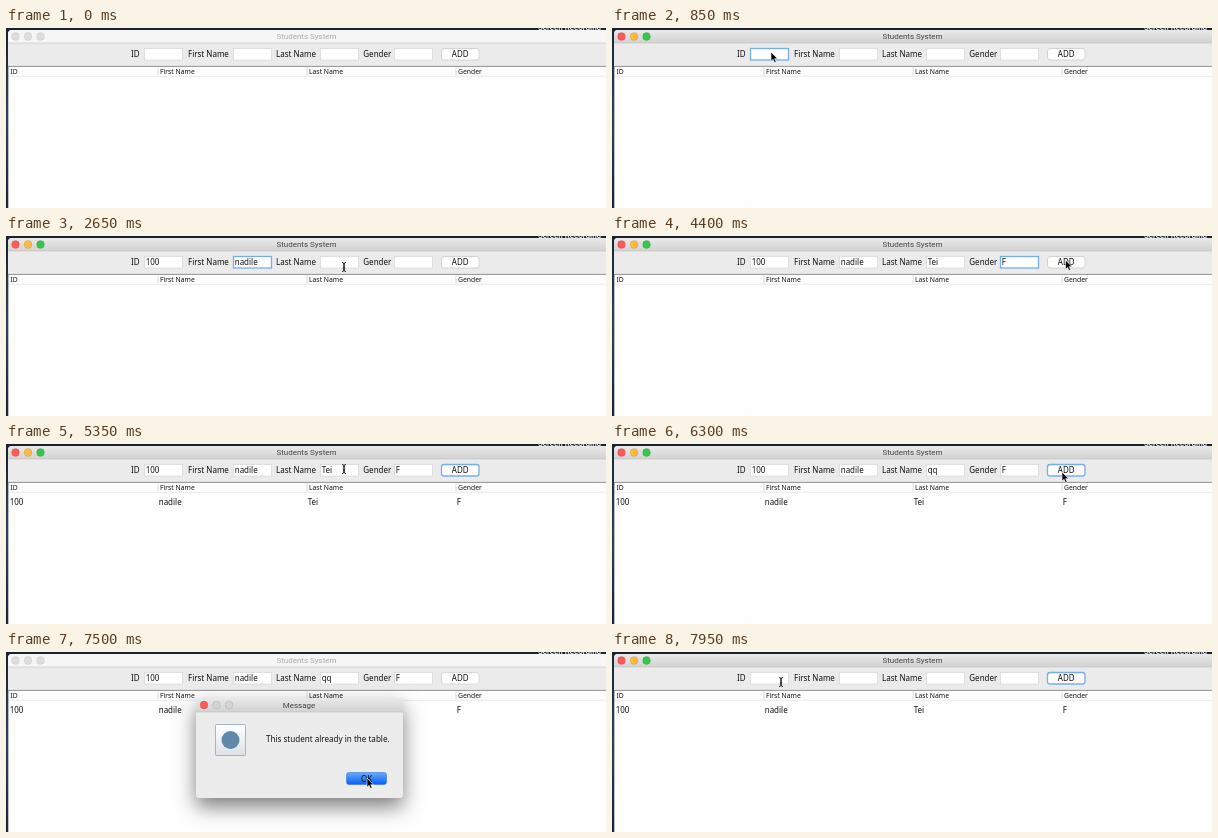
Animation of 600x180 px, one loop 8 s. Source, as an HTML page:

```html
<!DOCTYPE html>
<html lang="en">
<head>
<meta charset="utf-8">
<title>Students System</title>
<style>
  html, body { margin: 0; width: 100%; height: 100%; overflow: hidden; background: #fff; }
  svg { display: block; width: 600px; height: 180px; }
  text { font: 500 8px "Noto Sans", "Open Sans", sans-serif; fill: #111; white-space: pre; }
  .title { font: 400 8px Roboto, sans-serif; text-anchor: middle; fill: #444; }
  .head { font-size: 6.8px; }
  .mid { text-anchor: middle; }
  .field { fill: #fff; stroke: #d0d0d0; stroke-width: .6; }
  .button { fill: #fff; stroke: #c4c4c4; stroke-width: .7; }
  .focus { stroke: #78aee6; stroke-width: 1.3; }
  .inactive .title { fill: #aaa; }
  .inactive .focus { stroke: #c8c8c8; stroke-width: .6; }
  .inactive #bar { fill: #f6f6f6; }
  .inactive .light { fill: #dedede; stroke: #cacaca; }
  .light { stroke-width: .5; }
  #dialog .frame { filter: drop-shadow(0 9px 10px rgba(0,0,0,.5)); }
</style>
</head>
<body>
<svg id="stage" viewBox="0 0 600 180">
  <defs>
    <linearGradient id="chrome" x2="0" y2="1"><stop stop-color="#e9e9e9"/><stop offset="1" stop-color="#d2d2d2"/></linearGradient>
    <linearGradient id="desk" x2="0" y2="1"><stop stop-color="#182233"/><stop offset=".5" stop-color="#2c3c5c"/><stop offset="1" stop-color="#141c38"/></linearGradient>
    <linearGradient id="blue" x2="0" y2="1"><stop stop-color="#63aefc"/><stop offset="1" stop-color="#0a5cf8"/></linearGradient>
    <linearGradient id="tile" x2="0" y2="1"><stop stop-color="#fff"/><stop offset="1" stop-color="#dce2e8"/></linearGradient>
  </defs>
  <rect width="600" height="180" fill="url(#desk)"/>
  <text x="532" y="2.3" style="font:500 8px Roboto,sans-serif;fill:#fff">Screen Recording</text>
  <g id="window">
    <path d="M2 180V6q0-4 4-4H600V180Z" fill="#fefefe"/>
    <path id="bar" d="M2 15V6q0-4 4-4H600V15Z" fill="url(#chrome)"/>
    <path d="M2 15H600V38H2Z" fill="#ebebeb"/>
    <path d="M2 15H600" stroke="#c2c2c2" stroke-width=".6"/>
    <path d="M2 38.4H600" stroke="#777" stroke-width=".8"/>
    <path d="M2 48.3H600" stroke="#d8d8d8" stroke-width=".6"/>
    <path d="M2.3 38V180" stroke="#777" stroke-width=".6"/>
    <text class="title" x="300.5" y="11.3">Students System</text>
  </g>
  <g id="row"></g>
  <g id="dialog">
    <rect class="frame" x="190" y="46" width="207" height="100" rx="3.5" fill="#ececec"/>
    <path d="M190 60V49.500q0-3.500 3.500-3.500H393.500q3.500 0 3.500 3.500V60Z" fill="url(#chrome)"/>
    <path d="M190 60H397" stroke="#bcbcbc" stroke-width=".6"/>
    <text class="title" x="293" y="56">Message</text>
    <rect x="209.500" y="72.500" width="30" height="31" rx="1" fill="url(#tile)" stroke="#93a5b8" stroke-width=".8"/>
    <circle cx="224.500" cy="88" r="9" fill="#5f87a8"/>
    <text x="260" y="90" style="font-size:8.07px">This student already in the table.</text>
    <rect x="340.500" y="120.500" width="40" height="12" rx="2.500" fill="url(#blue)" stroke="#2a67cc" stroke-width=".5"/>
    <text class="mid" x="360.500" y="129.500">OK</text>
  </g>
  <path id="arrow" d="M0 0V9.200L2.100 7.300L3.500 10.500L5.100 9.800L3.700 6.700H6.500Z" fill="#000" stroke="#fff" stroke-width=".6"/>
  <path id="beam" d="M-2-4.500Q0-4.500 0-3V3Q0 4.500-2 4.500M2-4.500Q0-4.500 0-3V3Q0 4.500 2 4.500M-1 1H1" fill="none" stroke="#111" stroke-width=".9"/>
</svg>
<script>
const $ = id => document.getElementById(id);
function add(parent, tag, attrs, text = "") {
  const el = document.createElementNS("http://www.w3.org/2000/svg", tag);
  for (const key in attrs) el.setAttribute(key, attrs[key]);
  el.textContent = text;
  return parent.appendChild(el);
}
const win = $("window"), dialog = $("dialog");
const FIRST = "nadile", LAST = "Tei";

function lights(parent, x, y, fills) {
  fills.forEach((fill, i) => add(parent, "circle",
    { class: "light", cx: x + i * 12.5, cy: y, r: 3.9, fill, stroke: "rgba(0,0,0,.18)" }));
}
lights(win, 9.5, 8.5, ["#fc5b57", "#fdbc40", "#34c84a"]);
lights(dialog, 198, 53, ["#fc5b57", "#d4d4d4", "#d4d4d4"]);

const columns = [3, 152, 301, 450];
["ID", "First Name", "Last Name", "Gender"].forEach((name, i) => {
  add(win, "text", { class: "head", x: columns[i] + (i ? 2 : 1.5), y: 45.9 }, name);
  if (i) add(win, "path", { d: `M${columns[i]} 39.500V47.500`, stroke: "#ccc", "stroke-width": .7 });
  add($("row"), "text", { x: columns[i] + .7, y: 60.6 }, ["100", FIRST, LAST, "F"][i]);
});

const inputs = [["ID", 125, 138.5], ["First Name", 182, 227.5], ["Last Name", 270, 314.5], ["Gender", 357.3, 388.5]]
  .map(([name, x, left]) => {
    add(win, "text", { x, y: 29.4 }, name);
    const box = add(win, "rect", { class: "field", x: left, y: 20.5, width: 38, height: 11.5 });
    return { box, text: add(win, "text", { x: left + 1.2, y: 29.4 }) };
  });
const button = add(win, "rect", { class: "button", x: 435.5, y: 20.5, width: 37.5, height: 11.5, rx: 2.5 });
add(win, "text", { class: "mid", x: 454.2, y: 29.2 }, "ADD");
const targets = [...inputs.map(i => i.box), button];

// Typing runs: field, start, ms per key, text
const typing = [
  [0, 1150, 150, "100"], [1, 1800, 110, FIRST], [2, 2950, 130, LAST],
  [3, 3950, 50, "F"], [2, 5600, 150, "qq"]
];
// Focus changes: time, target
const focusSteps = [[750, 0], [1650, 1], [2750, 2], [3700, 3], [4550, 4], [5450, 2], [6300, 4]];
// Pointer path: time, x, y
const path = [
  [50, 560, -12], [650, 159, 24], [1400, 159, 24], [1650, 248, 27], [2500, 248, 27],
  [2650, 338, 31], [3400, 338, 31], [3550, 370, 45], [3700, 408, 28], [4150, 408, 28],
  [4400, 453.5, 24], [4650, 453.5, 24], [4850, 476, 26], [5000, 470, 26], [5300, 338, 25],
  [5950, 338, 25], [6250, 450, 28], [6850, 450, 28], [7250, 361, 126], [7650, 361, 126],
  [7900, 169, 30], [8000, 169, 30]
];

function pointerAt(t) {
  let i = 0;
  while (i < path.length - 2 && t >= path[i + 1][0]) i++;
  const [a, ax, ay] = path[i], [b, bx, by] = path[i + 1];
  const p = Math.min(1, Math.max(0, (t - a) / (b - a))), e = p * p * (3 - 2 * p);
  return [ax + (bx - ax) * e, ay + (by - ay) * e];
}
const show = (el, on) => el.style.display = on ? "" : "none";

function draw(t) {
  const dialogOpen = t >= 6400 && t < 7600;
  win.classList.toggle("inactive", t < 700 || (t >= 6400 && t < 7700));
  const values = ["", "", "", ""];
  if (t < 7600) for (const [field, start, pace, word] of typing)
    if (t >= start) values[field] = word.slice(0, 1 + Math.floor((t - start) / pace));
  inputs.forEach((input, i) => input.text.textContent = values[i]);

  const focused = focusSteps.filter(s => t >= s[0]).pop();
  targets.forEach((el, i) => el.classList.toggle("focus", !!focused && focused[1] === i));
  show($("row"), t >= 4600);
  show(dialog, dialogOpen);

  // The pointer hides while keys are pressed
  const hidden = typing.some(([, start, pace, word]) => t >= start && t < start + pace * word.length);
  const [x, y] = pointerAt(t);
  const overField = t > 900 && !dialogOpen && y > 19 && y < 33 &&
    inputs.some(({ box }) => x >= +box.getAttribute("x") && x <= +box.getAttribute("x") + 38);
  for (const [id, on] of [["arrow", !overField], ["beam", overField]]) {
    $(id).setAttribute("transform", `translate(${x} ${y})`);
    show($(id), on && !hidden);
  }
}

const origin = performance.now();
function tick() {
  draw(Math.floor((performance.now() - origin) % 8000 / 50) * 50);
  requestAnimationFrame(tick);
}
tick();
</script>
</body>
</html>
```
